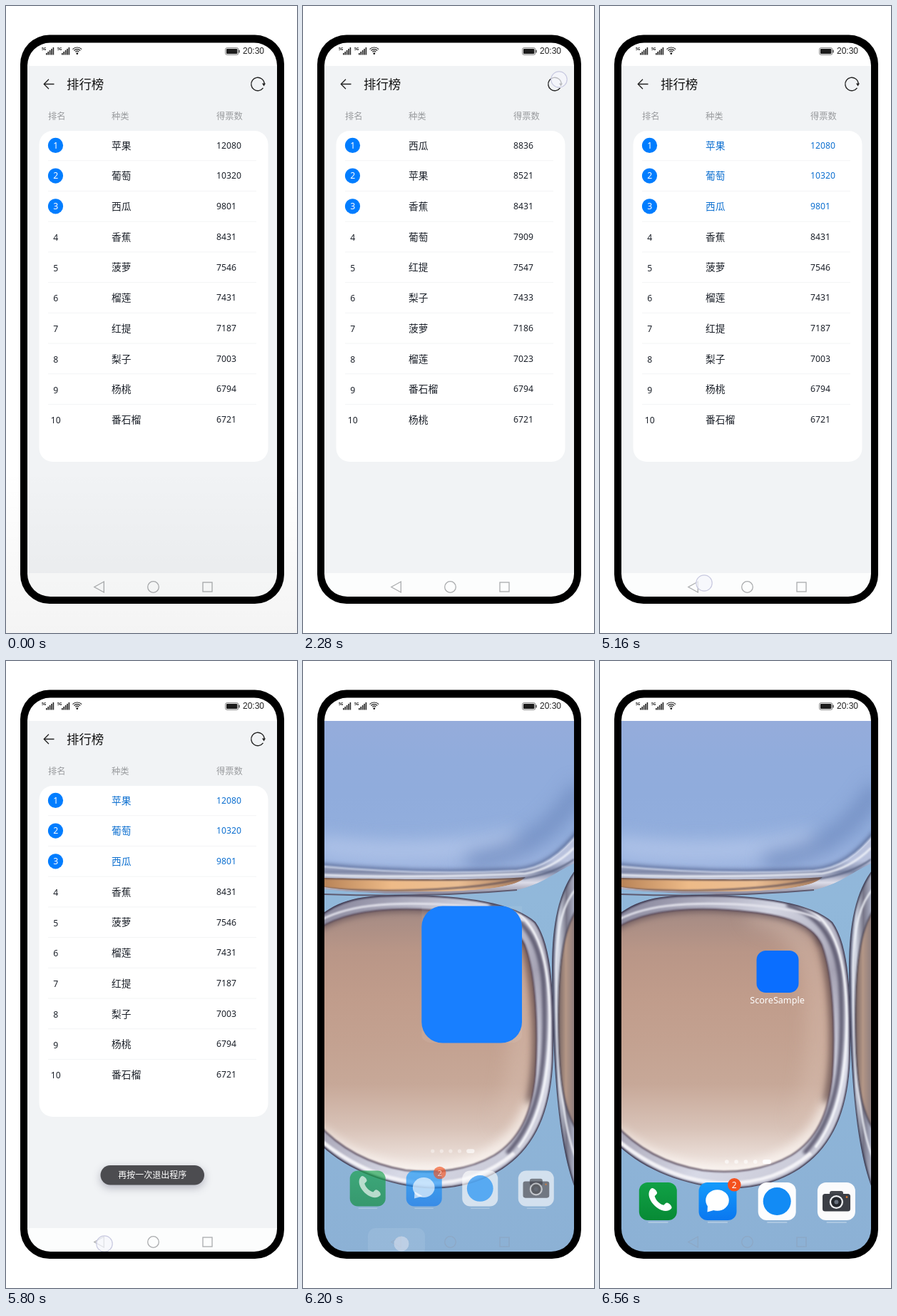
These frames come from a looping animation (408 px wide and 879 px high, 6.6 s). An HTML page with a canvas:

```html
<!DOCTYPE html>
<html lang="zh">
<head>
<meta charset="utf-8">
<title>排行榜</title>
<style>
html, body { margin: 0; width: 100%; height: 100%; overflow: hidden; background: #fff; }
canvas { display: block; width: 408px; height: 879px; }
</style>
</head>
<body>
<canvas id="stage"></canvas>
<script>
const W = 408, H = 879, LOOP = 6600, STEP = 40;
const dpr = window.devicePixelRatio || 1;

function prepare(canvas) {
  canvas.width = W * dpr;
  canvas.height = H * dpr;
  const ctx = canvas.getContext('2d');
  ctx.scale(dpr, dpr);
  return ctx;
}
let g = prepare(document.getElementById('stage'));

const SANS = '"Noto Sans", "Noto Sans CJK SC", "Noto Sans CJK", sans-serif';
const CJK = '"Noto Sans CJK SC", "Noto Sans CJK", sans-serif';
const BLUE = '#007dff', INK = '#1b2029';
const SCREEN = { x: 30, y: 84, w: 350, h: 744 };
const ICON = { x: 219.5, y: 406, w: 59, h: 59 };

const FIRST = [['苹果', 12080], ['葡萄', 10320], ['西瓜', 9801], ['香蕉', 8431], ['菠萝', 7546],
  ['榴莲', 7431], ['红提', 7187], ['梨子', 7003], ['杨桃', 6794], ['番石榴', 6721]];
const SECOND = [['西瓜', 8836], ['苹果', 8521], ['香蕉', 8431], ['葡萄', 7909], ['红提', 7547],
  ['梨子', 7433], ['菠萝', 7186], ['榴莲', 7023], ['番石榴', 6794], ['杨桃', 6721]];
const PICKED_AT = [3320, 3880, 4200];
// x, y, start, end
const TOUCHES = [[357, 111, 1720, 2000], [359, 103, 2280, 2600], [267, 195, 3240, 3600],
  [267, 238, 3800, 4040], [267, 281, 4120, 4360], [146, 809, 5160, 5440]];

const clamp = v => Math.max(0, Math.min(1, v));
const ramp = (v, a, b) => clamp((v - a) / (b - a));
const mix = (a, b, k) => a + (b - a) * k;

function layer(alpha, draw) {
  if (alpha <= 0) return;
  g.save();
  g.globalAlpha *= alpha;
  draw();
  g.restore();
}

function text(str, x, y, size, color, { font = CJK, weight = 400, align = 'left', rise = 0.38 } = {}) {
  g.font = `${weight} ${size}px ${font}`;
  g.textAlign = align;
  g.fillStyle = color;
  g.fillText(str, x, y + size * rise);
}

const digits = (str, x, y, size, color, opt = {}) =>
  text(str, x, y, size, color, { font: SANS, rise: 0.357, ...opt });

function box(x, y, w, h, r, color) {
  g.beginPath();
  g.roundRect(x, y, w, h, r);
  g.fillStyle = color;
  g.fill();
}

function disc(x, y, r, color) {
  g.beginPath();
  g.arc(x, y, r, 0, 7);
  g.fillStyle = color;
  g.fill();
}

function line(points, color, width = 1.3, close = false) {
  g.beginPath();
  points.forEach(([x, y]) => g.lineTo(x, y));
  if (close) g.closePath();
  g.strokeStyle = color;
  g.lineWidth = width;
  g.stroke();
}

function ring(x, y, r, color, width, from = 0, to = Math.PI * 2) {
  g.beginPath();
  g.arc(x, y, r, from, to);
  g.strokeStyle = color;
  g.lineWidth = width;
  g.stroke();
}

function blend(x0, y0, x1, y1, ...colors) {
  const fill = g.createLinearGradient(x0, y0, x1, y1);
  colors.forEach((c, i) => fill.addColorStop(i / (colors.length - 1), c));
  return fill;
}

function shape(d, fill) {
  g.fillStyle = fill;
  g.fill(new Path2D(d));
}

function streak(d, color, width, blur = 0.6) {
  g.save();
  g.filter = `blur(${blur * dpr}px)`;
  g.strokeStyle = color;
  g.lineWidth = width;
  g.stroke(new Path2D(d));
  g.restore();
}

// A filled form with soft streaks kept inside its outline.
function glass(d, fill, ...streaks) {
  g.save();
  g.clip(new Path2D(d));
  shape(d, fill);
  streaks.forEach(s => streak(...s));
  g.restore();
}

function wallpaper() {
  g.fillStyle = blend(0, 84, 0, 828, '#91aedc', '#91b8da', '#8eb5d8', '#8cb1d5');
  g.fillRect(30, 84, 350, 744);

  const lens = 'M30 84H390V236C362 272 335 291 300 294C200 299 100 295 30 288Z';
  const lensEdge = 'M20 287C100 295 200 299 300 294C335 291 362 272 390 236';
  glass('M30 84H380V284C350 298 336 313 300 321C220 330 100 328 30 320Z',
    blend(0, 280, 0, 326, '#b9c2dd', '#8089a8', '#dcdce8', '#8d8a9d'));
  glass(lens, blend(0, 84, 0, 296, '#95acdb', '#91acdc', '#90acdc', '#92aedd', '#9db4e0'),
    ['M20 258C120 272 220 268 300 248', 'rgba(186,203,236,.75)', 24, 12],
    ['M230 282C310 270 352 236 390 176', 'rgba(98,124,178,.55)', 26, 12],
    [lensEdge, 'rgba(62,76,120,.75)', 7, 3]);
  streak(lensEdge, '#d8e0f2', 2, 0.8);
  glass('M30 304C110 306 240 308 312 303C302 315 260 323 180 323C110 324 60 322 30 317Z',
    blend(30, 0, 312, 0, '#b98458', '#eebb88', '#eabd92', '#a2775a'),
    ['M30 304C110 306 240 308 312 303', '#5c4a4c', 3, 1],
    ['M30 318C80 325 240 324 312 303', '#5f4f55', 2, 1]);
  streak('M30 300C120 304 240 301 312 298C345 292 366 276 380 262', '#eef1f8', 2.5, 0.8);
  streak('M308 305C340 300 362 291 380 278', '#525b7a', 2, 0.8);
  streak('M30 327C120 330 220 328 300 321', '#5f5b70', 2, 0.7);

  const sideEdge = 'M384 290C358 322 349 370 349 430C350 560 356 680 384 746';
  glass(sideEdge + 'Z', blend(348, 0, 380, 0, '#6d718c', '#d0d5e2', '#777688', '#a9aec2'),
    ['M384 318C364 340 356 372 355 430C355 540 361 650 384 700', '#f0f3f9', 2.5, 1],
    [sideEdge, '#3f4159', 4, 1.2]);
  glass('M384 348C364 378 358 430 358 500C358 570 362 624 384 658Z',
    blend(357, 0, 380, 0, '#70605f', '#b39686', '#907f7e'));
  streak('M384 348C364 378 358 430 358 500C358 570 362 624 384 658', '#4f4958', 2, 0.9);

  const rim = 'M20 360C50 334 82 328 140 328C228 328 298 340 326 366C350 400 352 470 351 550C350 610 336 662 300 696C262 732 210 742 170 739C106 733 54 708 20 674';
  const body = 'M20 376C60 350 120 345 180 349C250 354 296 364 311 398C327 440 330 520 326 580C321 636 302 672 268 693C232 714 186 719 144 714C96 706 54 686 20 648';
  glass(rim + 'Z', blend(60, 330, 340, 720, '#8b899e', '#d3d5e2', '#a6a3b4', '#d7d9e6', '#c4c3d0'),
    ['M262 342C312 358 332 394 337 450C343 560 334 640 286 690', '#5b586e', 6, 2],
    ['M286 344C334 366 345 428 346 500C346 580 334 640 302 682', '#f6f7fb', 3, 0.9],
    ['M20 366C60 342 120 338 190 341C240 344 290 350 310 364', '#e3e3ec', 3, 1],
    ['M20 668C70 710 120 730 176 732C226 732 262 718 296 690', '#f3f2f6', 5, 1.2],
    [rim, '#3f3c54', 4, 1]);
  glass(body + 'Z', blend(0, 346, 0, 716, '#a38a84', '#b99687', '#c09c8b', '#c3a190', '#c7a898', '#d8c2b7', '#f3ebe7'),
    ['M210 350C270 364 300 400 305 470C309 540 306 600 284 650', 'rgba(222,198,184,.45)', 30, 14],
    ['M300 366C326 420 336 540 318 620', 'rgba(78,58,60,.75)', 10, 5],
    ['M20 376C60 350 120 345 180 349C250 354 296 364 311 398', 'rgba(88,70,78,.7)', 8, 4],
    ['M20 660C70 704 130 720 190 716C250 708 300 680 320 620', 'rgba(255,250,247,.8)', 16, 8]);
  streak(body, '#58495a', 2, 0.8);
}

const wall = document.createElement('canvas');
const stage = g;
g = prepare(wall);
wallpaper();
g = stage;

function statusBar() {
  g.fillStyle = '#fff';
  g.fillRect(30, 51, 350, 33);
  for (const x of [50, 72]) {
    digits('5G', x, 60, 5, '#222', { weight: 700 });
    for (let i = 0; i < 5; i++) {
      const h = 2.5 + i * 2;
      g.fillStyle = '#222';
      g.fillRect(x + 6 + i * 2.4, 68.5 - h, 1.6, h);
    }
  }
  for (const r of [9, 6.3, 3.6]) ring(99.8, 67, r, '#222', 1.2, -2.35, -0.79);
  disc(99.8, 66.7, 1.4, '#222');
  g.beginPath();
  g.roundRect(307.7, 58.7, 18, 9.6, 2);
  g.strokeStyle = '#555';
  g.lineWidth = 0.8;
  g.stroke();
  box(309, 60, 15.4, 7, 1, '#1c1c1c');
  box(326.4, 61.5, 1.3, 4, 0.6, '#333');
  text('20:30', 332, 63, 12, '#222', { font: '"Liberation Sans", Arial, sans-serif', rise: 0.355 });
}

function navIcons(color) {
  line([[123.8, 814.5], [137.3, 807], [137.3, 822]], color, 1.3, true);
  ring(206.5, 814.5, 7.8, color, 1.3);
  g.strokeRect(276, 808, 13, 13);
}

function app(t) {
  g.fillStyle = '#f1f3f5';
  g.fillRect(30, 84, 350, 712);
  g.fillStyle = '#fcfdfd';
  g.fillRect(30, 795, 350, 33);

  line([[67.5, 109.5], [53.5, 109.5]], '#222');
  line([[60, 102.8], [53.3, 109.5], [60, 116.2]], '#222');
  text('排行榜', 85, 109.5, 17.4, '#111', { weight: 500 });
  ring(353, 109.5, 9.2, '#222', 1.4, 0.62, Math.PI * 2 - 0.05);
  shape('M358.9 108.6H364L361.6 112.4Z', '#222');

  [['排名', 59], ['种类', 148], ['得票数', 295]].forEach(([s, x]) => text(s, x, 154, 12.3, '#999b9e'));
  box(46.5, 175, 321, 464, 19, '#fff');

  const rows = t >= 1800 && t < 2360 ? SECOND : FIRST;
  rows.forEach(([name, votes], i) => {
    const y = 195.4 + i * 42.7;
    const color = t >= PICKED_AT[i] ? '#0c6fd0' : INK;
    if (i < 3) disc(69.5, y, 10.6, BLUE);
    digits(i + 1, 69.7, i < 3 ? y : y + 1.2, 12.2, i < 3 ? '#fff' : INK, { align: 'center' });
    text(name, 148, y, 13.7, color, { weight: 500 });
    digits(votes, 295, y, 12.2, color);
    if (i < 9) line([[59, y + 21.4], [351, y + 21.4]], '#f3f4f5', 1);
  });

  layer(ramp(t, 5200, 5400), () => {
    g.save();
    g.shadowColor = 'rgba(60,60,90,.35)';
    g.shadowBlur = 12 * dpr;
    g.shadowOffsetY = 4 * dpr;
    box(132.5, 707, 145.5, 27.5, 13.7, '#4c4c50');
    g.restore();
    text('再按一次退出程序', 205.2, 720.6, 12, '#fff', { align: 'center' });
  });
}

const tile = (x, color) => box(x - 26.5, 731, 53, 53, 12, color);

function dock() {
  for (let i = 0; i < 4; i++) disc(177.8 + i * 13.3, 702, 2.8, 'rgba(255,255,255,.6)');
  box(228, 699, 12, 6, 3, '#fff');

  tile(81.3, blend(0, 731, 0, 784, '#11a146', '#078a35'));
  g.save();
  g.translate(83, 756.5);
  g.rotate(Math.PI / 4);
  shape('M-20 -4C-20 -8 -9 -8 -9 -4V0C-4 3 4 3 9 0V-4C9 -8 20 -8 20 -4C20 14 -20 14 -20 -4Z', '#fff');
  g.restore();

  tile(165, blend(0, 731, 0, 784, '#159bfb', '#0a77f0'));
  g.beginPath();
  g.ellipse(164.5, 756, 16.3, 14.8, 0, 0, 7);
  g.fillStyle = '#fff';
  g.fill();
  shape('M151 762L150.5 772.5L163 769Z', '#fff');
  disc(188.3, 734.3, 9.3, '#f4511e');
  digits('2', 188.3, 734.3, 12, '#fff', { align: 'center' });

  tile(248.2, '#fdfdfe');
  disc(248.2, 757.5, 19.5, '#128bf5');

  tile(331.4, '#fbfbfc');
  box(322, 743, 19, 10, 3, '#44474d');
  box(312, 747, 39, 24.5, 3.5, '#3b3e45');
  disc(331.4, 758.5, 9.6, '#f0f1f3');
  disc(331.4, 758.5, 7.3, '#24272d');
  disc(331.4, 758.5, 3, '#68707d');
  disc(346, 751.5, 1.3, '#f4822a');

  for (let i = 0; i < 4; i++) {
    g.fillStyle = 'rgba(255,255,255,.55)';
    g.fillRect(67.5 + i * 83.4, 786.5, 28, 1);
  }
}

function home(p) {
  layer(ramp(p, 0.3, 0.95), () => {
    const s = 0.8 + 0.2 * p, cx = 249, cy = 436;
    g.translate(cx, cy);
    g.scale(s, s);
    g.translate(-cx, -cy);
    dock();
  });
  layer(ramp(p, 0.85, 1), () =>
    text('ScoreSample', 248.5, 476, 12.6, '#fff', { font: SANS, align: 'center', rise: 0.35 }));
}

// The window shrinks faster in height than in width.
function closingWindow(t, p) {
  const q = 1 - Math.pow(1 - p, 1.29);
  const x = mix(SCREEN.x, ICON.x, p), w = mix(SCREEN.w, ICON.w, p);
  const y = mix(SCREEN.y, ICON.y, q), h = mix(SCREEN.h, ICON.h, q);
  layer(1 - ramp(p, 0.4, 0.74), () => {
    g.translate(x, y);
    g.scale(w / SCREEN.w, h / SCREEN.h);
    g.translate(-SCREEN.x, -SCREEN.y);
    g.beginPath();
    g.roundRect(SCREEN.x, SCREEN.y, SCREEN.w, SCREEN.h, [3, 3, 42, 42]);
    g.clip();
    app(t);
  });
  const blue = `rgb(${mix(60, 10, p)}, ${mix(170, 110, p)}, 255)`;
  layer(ramp(p, 0.35, 0.71), () => box(x, y, w, h, mix(42, 13, ramp(p, 0.5, 1)), blue));
}

function touch(x, y) {
  disc(x, y, 11.2, 'rgba(246,247,253,.72)');
  ring(x, y, 11.2, '#c8c9e0', 1.2);
}

function draw(t) {
  g.fillStyle = '#fff';
  g.fillRect(0, 0, W, H);
  box(20, 40.6, 370, 797.4, 41, '#000');

  g.save();
  g.beginPath();
  g.roundRect(30, 51.5, 350, 776.5, 32);
  g.clip();

  const u = ramp(t, 5939, 6344);
  const p = (1 - Math.cos(Math.PI * u)) / 2;
  if (u > 0) {
    g.drawImage(wall, 0, 0, W, H);
    home(p);
    navIcons('rgba(140,150,165,.35)');
    layer(1 - ramp(t, 6160, 6400), () => {
      box(91, 795, 80, 40, 11, 'rgba(255,255,255,.1)');
      disc(138, 817, 10.5, 'rgba(214,222,238,.75)');
    });
    closingWindow(t, p);
  } else {
    app(t);
    navIcons('#aaacae');
    if (t >= 5800) touch(138, 817);
  }
  statusBar();
  for (const [x, y, start, end] of TOUCHES) {
    if (t >= start) layer(1 - ramp(t, end - 160, end), () => touch(x, y));
  }
  g.restore();

  // soft shade at the foot of the opening
  layer(1 - ramp(t, 1280, 1400), () => {
    g.fillStyle = blend(0, 650, 0, 879, 'rgba(0,0,0,0)', 'rgba(0,0,0,.045)');
    g.fillRect(0, 650, W, 229);
  });
}

function tick() {
  draw(Math.floor((performance.now() % LOOP) / STEP) * STEP);
  requestAnimationFrame(tick);
}
tick();
</script>
</body>
</html>
```
